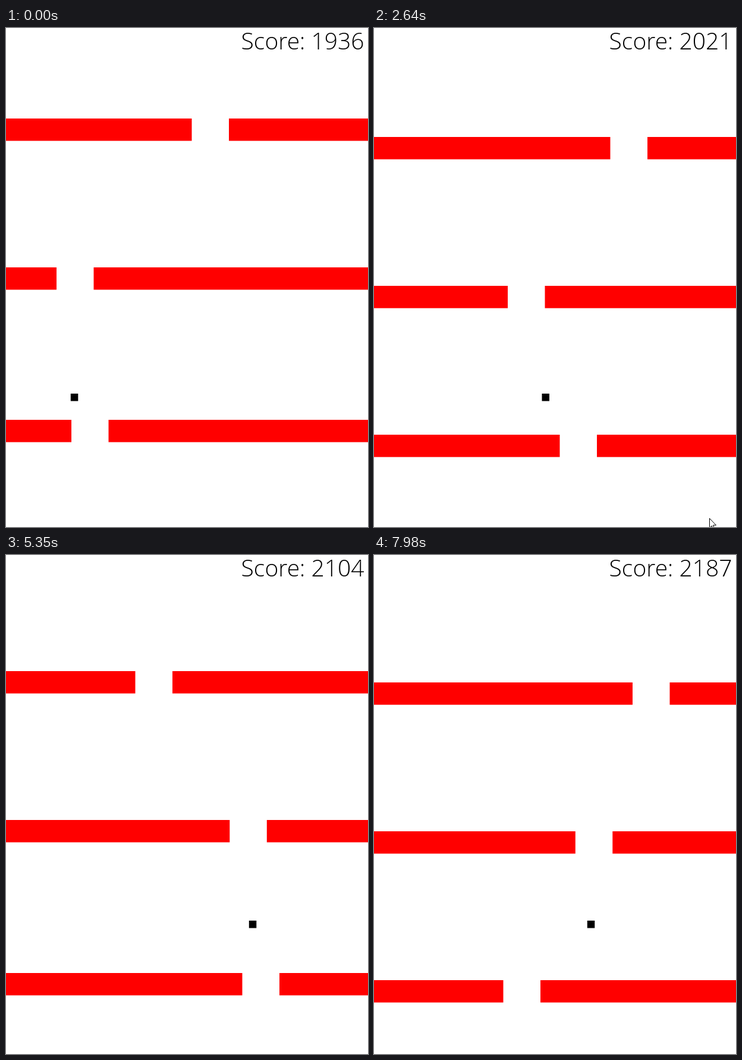
An HTML page with a canvas that plays this animation: 609x838 px, repeating every 8000 ms.

```html
<!DOCTYPE html>
<html lang="en">
<head>
<meta charset="utf-8">
<title>Gap runner</title>
<style>
  html, body { margin: 0; width: 100%; height: 100%; overflow: hidden; background: #fff; }
  canvas { display: block; }
</style>
</head>
<body>
<canvas id="stage" width="609" height="838"></canvas>
<script>
const WIDTH = 609, HEIGHT = 838, LOOP = 8000, FIRST_SCORE = 1936;
const FALL = 6.25, BAR_HEIGHT = 37.5, GAP = 62.5;
const PLAYER = 12.5, PLAYER_Y = 614, PLAYER_SPEED = 8.7;

const gaps = [110, 85, 312.5, 225, 397.5, 376.3, 217.5, 338.8, 435];
const stops = [108.8, 361, 282.5, 440, 408.8, 245, 358.8]; // where the player waits for bars 1, 2, ...
const pace = [[0, 0], [2640, 85], [4300, 134.45], [LOOP, 251.1]]; // [ms, tick]

const ctx = document.getElementById('stage').getContext('2d');
const clamp = (value, low, high) => Math.min(high, Math.max(low, value));

function tickAt(time) {
  const next = pace.findIndex(([end]) => end > time);
  const [t0, k0] = pace[next - 1], [t1, k1] = pace[next];
  return Math.round(k0 + (k1 - k0) * (time - t0) / (t1 - t0));
}

// Bars come every 40 ticks, and one tick later at every fourth bar.
const barY = (i, tick) => 658 - 250 * i + FALL * (tick - Math.ceil(i / 4));

// Once a bar has passed, the player runs to the next stop at constant speed.
function playerX(tick) {
  let x = stops[0];
  for (let i = 1; i < stops.length; i++) {
    const ticksSincePass = (barY(i, tick) - PLAYER_Y - PLAYER) / FALL;
    const reach = PLAYER_SPEED * Math.max(0, ticksSincePass);
    x += clamp(stops[i] - stops[i - 1], -reach, reach);
  }
  return x;
}

function drawCursor(x, y) {
  const arrow = new Path2D('M0 0V16L3.7 12.5L6.2 18L8.4 17L6 11.5H11Z');
  ctx.save();
  ctx.translate(x, y);
  ctx.fillStyle = '#fff';
  ctx.fill(arrow);
  ctx.stroke(arrow);
  ctx.restore();
}

function draw(time) {
  const tick = tickAt(time);
  ctx.fillStyle = '#fff';
  ctx.fillRect(0, 0, WIDTH, HEIGHT);

  ctx.fillStyle = '#f00';
  gaps.forEach((gap, i) => {
    const y = Math.floor(barY(i, tick) + 0.45);
    ctx.fillRect(0, y, gap, BAR_HEIGHT);
    ctx.fillRect(gap + GAP, y, WIDTH, BAR_HEIGHT);
  });

  ctx.fillStyle = '#000';
  ctx.fillRect(playerX(tick), PLAYER_Y, PLAYER, PLAYER);

  ctx.font = '300 39px "Open Sans", "Noto Sans", sans-serif';
  ctx.textAlign = 'right';
  ctx.fillText('Score: ' + (FIRST_SCORE + tick), 602.5, 36);

  if (time >= 2520 && time < 2800) drawCursor(564.5, 823.5);
}

const start = performance.now();
function frame() {
  draw((performance.now() - start) % LOOP);
  requestAnimationFrame(frame);
}
frame();
</script>
</body>
</html>
```
